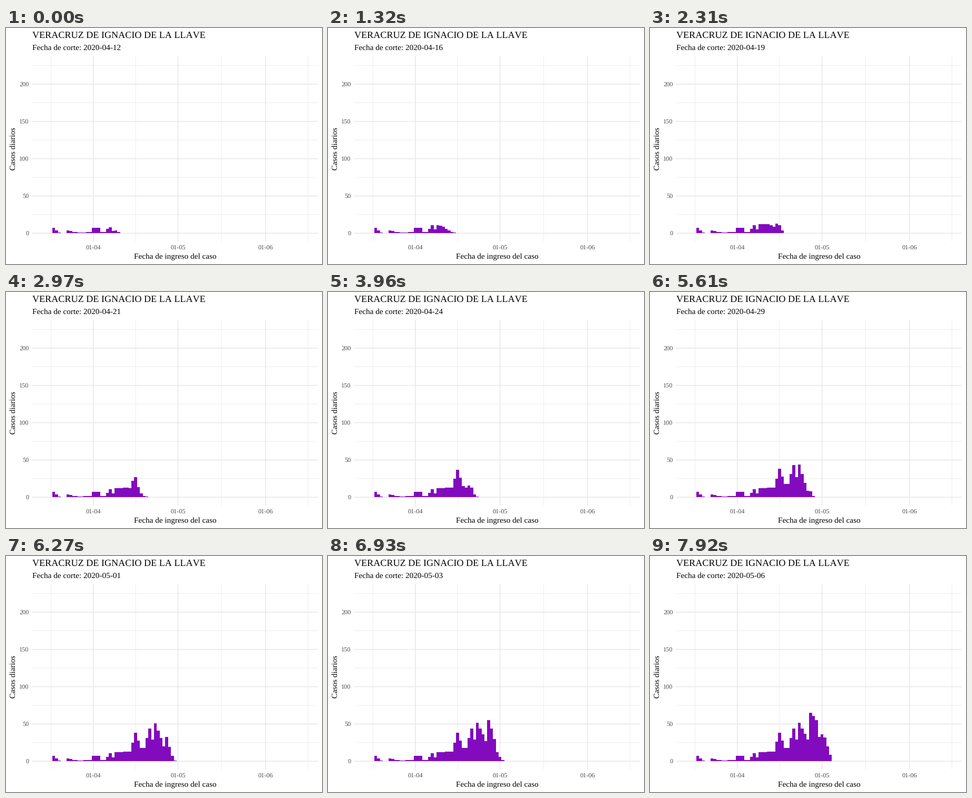
A matplotlib script for the animation above (8 s loop, 600 px wide and 450 px high).

```python
import numpy as np
import matplotlib.pyplot as plt
from matplotlib.animation import FuncAnimation

W, H, DPI = 600, 450, 100
LOOP, TICK, HOLD = 8000, 20, 330
PT = 72 / DPI
SMALL, NORMAL, LARGE = 12.2, 15.25, 18.1

plt.rcParams.update({
    "font.family": "Liberation Serif",
    "text.hinting": "none",
    "text.kerning_factor": 6,   # practically no kerning
    "toolbar": "None",
})

# Plot geometry in pixels, y pointing down
LEFT, RIGHT, TOP, BOTTOM = 50, 592, 53, 407
ZERO, UNIT = 391.4, 1.421
APRIL, DAY = 165.75, 5.361

# Cases by day since 18 March: the turning points of the curve
TURNS = [(0, 7), (2, 1), (4, 0), (5, 4), (9, 1), (13, 2), (14, 7), (16, 7),
         (17, 2), (18, 2), (20, 11), (21, 5), (22, 12), (27, 13), (29, 38),
         (31, 18), (32, 18), (34, 44), (35, 29), (36, 52), (39, 29),
         (40, 65), (42, 59), (43, 39), (45, 63), (47, 71)]
DAYS = np.arange(TURNS[-1][0] + 1)
CASES = np.interp(DAYS, *zip(*TURNS))
FIRST_CUT = 25                  # 12 April


def reported(step):
    """Daily counts known at a cut-off date; recent days are incomplete."""
    lag = np.maximum(FIRST_CUT + step - DAYS, 0)
    return np.round(CASES * (1 - np.exp(-(lag / 4.6) ** 2.4)))


def height(n):
    return ZERO - UNIT * n


fig = plt.figure(figsize=(W / DPI, H / DPI), dpi=DPI, facecolor="white")
ax = fig.add_axes([0, 0, 1, 1])
ax.axis("off")


def label(x, y, text, size, color="black", **kw):
    return ax.text(x, y, text, fontsize=size * PT, color=color,
                   va="baseline", **kw)


def grid(xs, ys, width):
    style = dict(colors="#E6E6E6", linewidths=width * PT, snap=False)
    ax.vlines(xs, TOP, BOTTOM, zorder=1, **style)
    ax.hlines(ys, LEFT, RIGHT, zorder=1, **style)


months = [APRIL + DAY * d for d in (0, 30, 61)]
halves = [APRIL + DAY * d for d in (-15, 15, 45.5, 76)]
grid(halves, [height(n) for n in range(25, 226, 50)], 0.73)
grid(months, [height(n) for n in range(0, 201, 50)], 1.455)

for n in range(0, 201, 50):
    label(43.5, height(n) + 4.2, str(n), SMALL, "#4D4D4D", ha="right")
for x, month in zip(months, (4, 5, 6)):
    label(x, 423, f"01-{month:02d}", SMALL, "#4D4D4D", ha="center")

label(LEFT, 20, "VERACRUZ DE IGNACIO DE LA LLAVE", LARGE)
date = label(LEFT, 42, "", NORMAL)
label(321, 440, "Fecha de ingreso del caso", NORMAL, ha="center")
label(18, 230, "Casos diarios", NORMAL, ha="center", rotation=90,
      rotation_mode="anchor")

edges = APRIL + DAY * (np.arange(len(DAYS) + 1) - 14.5)
bars = ax.stairs(height(reported(0)), edges, baseline=ZERO, fill=True,
                 color="#820BBE", linewidth=0, zorder=2)
bars.set_snap(True)
ax.set(xlim=(0, W), ylim=(H, 0))


def draw(i):
    step = (i * TICK + TICK // 2) // HOLD
    month, day = (4, 12 + step) if step < 19 else (5, step - 18)
    date.set_text(f"Fecha de corte: 2020-{month:02d}-{day:02d}")
    bars.set_data(values=height(reported(step)))
    return bars, date


anim = FuncAnimation(fig, draw, frames=LOOP // TICK, interval=TICK,
                     init_func=lambda: draw(0), repeat=True, repeat_delay=0)
plt.show()
```
